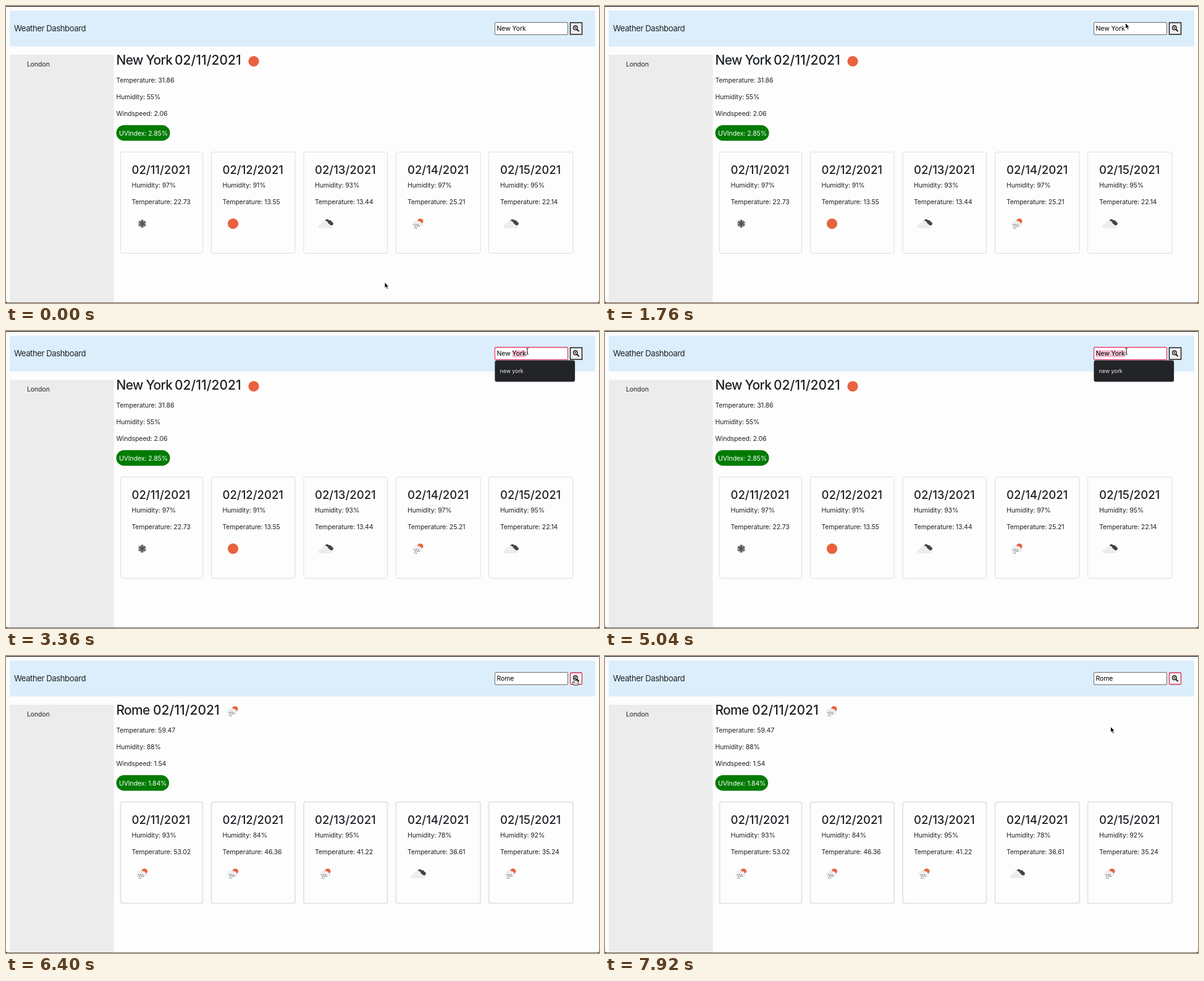
Write an HTML page that moves like this. It is 960 px wide and 481 px high and loops after 8000 ms.

```html
<!DOCTYPE html>
<html lang="en">
<head>
<meta charset="utf-8">
<title>Weather Dashboard</title>
<style>
  html, body { margin: 0; width: 100%; height: 100%; overflow: hidden; background: #fdfdfd; }
  svg { display: block; width: 960px; height: 481px; }
  text { font: 10.5px Inter, Roboto, sans-serif; letter-spacing: -.01em; fill: #1e2226; white-space: pre; }
  .brand { font-size: 13.1px; letter-spacing: -.032em; }
  .city { font-size: 21px; font-weight: 500; letter-spacing: -.035em; }
  .date { font-size: 21px; font-weight: 500; letter-spacing: 0; }
  .day { font-size: 18.5px; font-weight: 500; letter-spacing: 0; }
  .hint { font-size: 8.8px; letter-spacing: 0; fill: #f1f1f1; }
  .light { fill: #fff; }
  #field, #value { fill: #000; }
  .card { fill: none; stroke: #dedede; stroke-width: 1; }
  .soft .card { stroke: #e5e5e5; stroke-width: 2; }
</style>
</head>
<body>
<svg viewBox="0 0 960 481" xmlns="http://www.w3.org/2000/svg">
  <defs>
    <g id="sun"><circle r="8.6" fill="#e9623f"/></g>
    <g id="snow" fill="none" stroke="#484848" stroke-width="1.15" stroke-linecap="round"></g>
    <g id="cloud">
      <path d="M-1 -4.5L1.5 -7Q4 -8 6 -5.5Q9 -6.5 10.5 -3Q13 -2.5 12.8 .5Q12 3.8 8.5 3Z" fill="#444"/>
      <path d="M-9.500 7.500A2.800 2.800 0 0 1-9.500 2Q-8.500 -.5-6 -.7Q-4.500 -5 0 -4.700Q4 -4 4.800 -.2Q7 .2 7.500 2.200Q12 2.200 11.800 5Q11.500 7.500 8.500 7.500Z" fill="#ededed"/>
    </g>
    <g id="rain">
      <path d="M-8 4.500Q-11 2.500-8.500 -.3Q-7.500 -4.500-3 -5Q1 -7.500 4 -3Q8.500 -2.500 8 1.500Q7.500 4.500 4.500 4.500Z" fill="#ededed"/>
      <path d="M-1 -4.500Q-.2 -8.300 4 -8.300Q8.700 -7.800 8.500 -3.200Q8 -.5 5.800 -.3Q5.500 -3.200 2.700 -3.500Q1.200 -5-1 -4.500Z" fill="#e9623f"/>
      <path d="M-5.500 2h.1M-2.500 1.500h.1M.5 2h.1M-4 4.500h.1M-1 4.200h.1M1.800 4.600h.1M-5.300 7h.1M-2.400 7.400h.1" fill="none" stroke="#484848" stroke-width="1.5" stroke-linecap="round"/>
    </g>
    <g id="arrow">
      <path d="M0 0V9.300L2.200 7.300L3.800 11L5.500 10.200L3.900 6.700H6.700Z" fill="#000" stroke="#fff" stroke-width=".8" stroke-linejoin="round"/>
    </g>
    <g id="beam" fill="none" stroke="#222" stroke-width="1">
      <path d="M-2 -5Q0 -5 0 -4Q0 -5 2 -5M0 -4.500V4.500M-2 5Q0 5 0 4Q0 5 2 5M-1 1.500H1"/>
    </g>
    <g id="hand">
      <path d="M-1 0Q0 -1 1 0V3.600Q2 3 2.600 4Q3.600 3.500 4.200 4.600Q5.400 4.400 5.400 5.600V7.500Q5 9 4.200 10.800H-1.200Q-2 9-4 6.800Q-4.200 5.300-2.800 5.500L-1 7Z" fill="#fff" stroke="#000" stroke-width=".8" stroke-linejoin="round"/>
      <path d="M.9 6.500V9M2.700 6.500V9" stroke="#000" stroke-width=".5"/>
    </g>
  </defs>

  <rect width="960" height="481" fill="#fdfdfd"/>
  <rect width="960" height="1" fill="#000"/>
  <rect x="6" y="7.500" width="948" height="58" fill="#dceefb"/>
  <rect x="6" y="79" width="168.500" height="402" fill="#ececec"/>
  <text class="brand" x="13" y="41.200">Weather Dashboard</text>
  <text x="34" y="97.800">London</text>

  <rect id="box" x="791.500" y="26.500" width="118" height="20" rx="1.500" fill="#fff"/>
  <rect id="mark" y="31" height="11.500" fill="#f6c0d4"/>
  <text id="value" x="794.500" y="40.300"></text>
  <rect id="caret" y="31" width=".8" height="11.500" fill="#000"/>
  <rect id="button" x="913.500" y="27" width="19" height="19" fill="#efefef"/>
  <g fill="none" stroke="#111" stroke-width="1.300">
    <circle cx="921.800" cy="35.300" r="3.300"/>
    <path d="M924.300 37.800L927 40.500" stroke-width="1.900" stroke-linecap="round"/>
    <path d="M920.200 35.300H923.400M921.800 33.700V36.900" stroke-width=".9"/>
  </g>

  <g id="report">
    <text id="city" class="city" x="178.500" y="95.200"></text>
    <text id="today" class="date" y="95.200">02/11/2021</text>
    <use id="icon" y="89.500"/>
    <text id="temp" x="178.500" y="123.900"></text>
    <text id="hum" x="178.500" y="150.900"></text>
    <text id="wind" x="178.500" y="177.900"></text>
    <rect id="pill" x="178.500" y="193" height="25.300" rx="12.600" fill="#007b00"/>
    <text id="uv" class="light" x="183" y="209.600"></text>
    <g id="cards"></g>
  </g>

  <g id="list">
    <rect x="791" y="48.500" width="130.500" height="35" rx="3.500" fill="#000" opacity=".15"/>
    <rect x="791.500" y="47.500" width="129.500" height="34.500" rx="3" fill="#222427"/>
    <text class="hint" x="799.500" y="68.200">new york</text>
  </g>

  <path d="M0 480.300H960V481H0Z" fill="#444"/>
  <path d="M0 477Q0 481 4 481H0ZM960 477Q960 481 956 481H960Z" fill="#111"/>
  <use id="pointer"/>
</svg>
<script>
const $ = id => document.getElementById(id);
const set = (el, attrs) => { for (const k in attrs) el.setAttribute(k, attrs[k]); return el; };
const add = (parent, tag, attrs, text = '') => {
  const el = set(document.createElementNS('http://www.w3.org/2000/svg', tag), attrs);
  el.textContent = text;
  return parent.appendChild(el);
};
const show = (id, on) => set($(id), { visibility: on ? 'visible' : 'hidden' });

for (let i = 0; i < 6; i++)
  add($('snow'), 'path', { d: 'M0 0V-6.2M-2 -5.500L0 -3.800L2 -5.500M-1.800 -3L0 -1.500L1.800 -3', transform: `rotate(${i * 60})` });

const reports = [
  { city: 'New York', dateX: 273, icon: 'sun', iconX: 401, temp: '31.86', hum: 55, wind: '2.06', uv: '2.85', pill: 87,
    days: [[97, '22.73', 'snow'], [91, '13.55', 'sun'], [93, '13.44', 'cloud'], [97, '25.21', 'rain'], [95, '22.14', 'cloud']] },
  { city: 'Rome', dateX: 238, icon: 'rain', iconX: 367, temp: '59.47', hum: 88, wind: '1.54', uv: '1.84', pill: 85.5,
    days: [[93, '53.02', 'rain'], [84, '46.36', 'rain'], [95, '41.22', 'rain'], [78, '36.61', 'cloud'], [92, '35.24', 'rain']] }
];

// left edge, width and text start of each card
const cards = [[185.5, 133, 203.5], [332.5, 135.5, 350.5], [482, 135.5, 500], [631.5, 136.5, 650], [781.5, 136.5, 800]]
  .map(([x, width, tx], i) => {
    const g = $('cards');
    add(g, 'rect', { class: 'card', x, y: 236.5, width, height: 164, rx: 2.7 });
    add(g, 'text', { class: 'day', x: tx, y: 272.2 }, `02/${11 + i}/2021`);
    return {
      hum: add(g, 'text', { x: tx, y: 293.8 }),
      temp: add(g, 'text', { x: tx, y: 320.8 }),
      icon: add(g, 'use', { x: tx + 17, y: 352.5 })
    };
  });

function fill(r) {
  $('city').textContent = r.city;
  set($('today'), { x: r.dateX });
  set($('icon'), { x: r.iconX, href: '#' + r.icon });
  $('temp').textContent = 'Temperature: ' + r.temp;
  $('hum').textContent = `Humidity: ${r.hum}%`;
  $('wind').textContent = 'Windspeed: ' + r.wind;
  $('uv').textContent = `UVIndex: ${r.uv}%`;
  set($('pill'), { width: r.pill });
  r.days.forEach(([hum, temp, icon], i) => {
    cards[i].hum.textContent = `Humidity: ${hum}%`;
    cards[i].temp.textContent = 'Temperature: ' + temp;
    set(cards[i].icon, { href: '#' + icon });
  });
}

// pointer waypoints: time, x, y
const path = [
  [0, 613, 447.5], [880, 613, 447.5], [960, 658, 322], [1040, 709, 246], [1120, 725, 241], [1200, 753, 250],
  [1280, 765, 258], [1360, 777, 194], [1440, 791, 155], [1520, 820, 64], [1600, 842.5, 27.5], [1840, 842.5, 27.5],
  [2000, 844, 33], [5520, 844, 33], [5600, 868, 29], [5680, 895, 27], [5760, 926, 13], [5920, 921, 36.5],
  [7280, 921, 36.5], [7440, 890, 62], [7600, 840, 97], [7680, 826, 107], [7760, 818.5, 114.5], [8000, 818.5, 114.5]
];

function locate(t) {
  const i = path.findIndex(p => p[0] > t);
  const [t0, x0, y0] = path[i - 1], [t1, x1, y1] = path[i];
  const k = (t - t0) / (t1 - t0);
  return { x: x0 + (x1 - x0) * k, y: y0 + (y1 - y0) * k };
}

const LOOP = 8000, STEP = 80;
const FOCUS = 2240, WORD = 2640, ALL = 4320, TYPE = 5120, CLICK = 6160, RESULT = 6320;
let shown = -1, last = -1;

function draw(now) {
  const t = Math.floor(now % LOOP / STEP) * STEP;
  if (t !== last) {
    last = t;
    const next = t >= RESULT ? 1 : 0;
    if (next !== shown) fill(reports[shown = next]);
    $('report').setAttribute('class', next ? 'soft' : '');

    const typed = t >= TYPE;
    const focus = t >= FOCUS && t < CLICK;
    $('value').textContent = typed ? 'Rome'.slice(0, 1 + Math.floor((t - TYPE) / 120)) : 'New York';
    set($('box'), { stroke: focus ? '#e63f70' : '#6b6b6b', 'stroke-width': focus ? 1.3 : 1 });
    set($('button'), t >= CLICK
      ? { stroke: '#dc2f55', 'stroke-width': 1.3, rx: 1.5 }
      : { stroke: '#222', 'stroke-width': 1.5, rx: 0 });

    const start = t < ALL ? 819.5 : 794.5;
    set($('mark'), { x: start, width: 841.5 - start });
    show('mark', t >= WORD && !typed);
    show('list', t >= WORD && !typed);
    set($('caret'), { x: 841.5 });
    show('caret', t >= FOCUS && t < WORD);

    const { x, y } = locate(t);
    const kind = t >= 5920 && t < 7360 ? 'hand' : t >= 1920 && x < 910 && t < 5920 ? 'beam' : 'arrow';
    set($('pointer'), { href: '#' + kind, x, y });
    show('pointer', t < TYPE || t >= 5520);
  }
  requestAnimationFrame(draw);
}
draw(performance.now());
</script>
</body>
</html>
```
